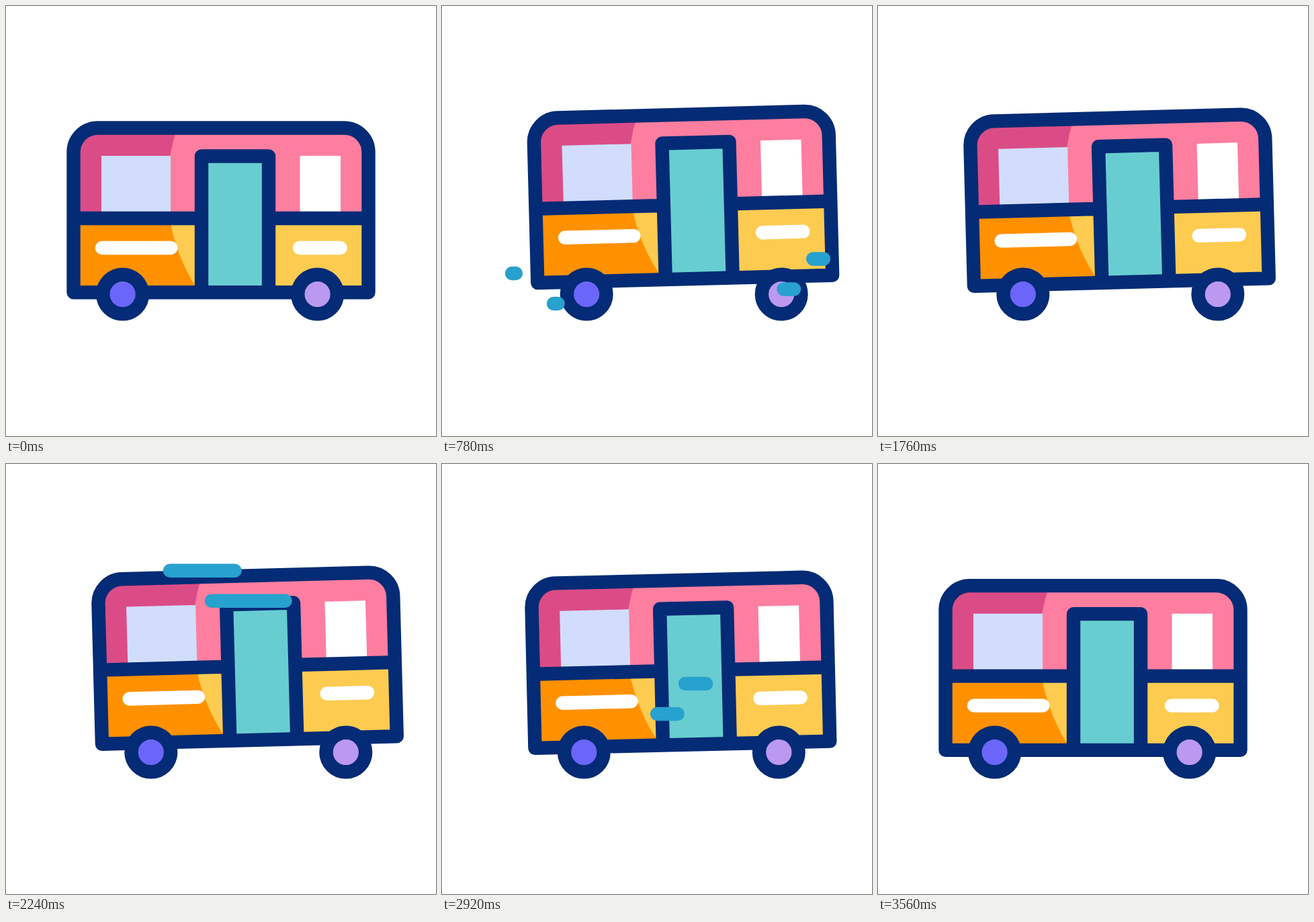
An HTML page that plays this animation: 640 by 640 pixels, repeating every 3.6 s.

```html
<!DOCTYPE html>
<html lang="en">
<head>
<meta charset="utf-8">
<title>Camper</title>
<style>
  html, body { margin: 0; width: 100%; height: 100%; overflow: hidden; background: #fff; }
  svg { display: block; width: 100vw; height: 100vh; }
</style>
</head>
<body>
<svg viewBox="0 0 640 640">
  <g id="body">
    <path fill="#fe7ea0" d="M100.5 316V217.500a36 36 0 0 1 36-36h367a36 36 0 0 1 36 36V316z"/>
    <path fill="#db4c86" d="M100.5 316V217.500a36 36 0 0 1 36-36H255A276 276 0 0 0 243.700 316z"/>
    <path fill="#fdcb50" d="M100.5 316h439v110h-439z"/>
    <path fill="#ff9100" d="M100.5 316H243.700A276 276 0 0 0 287.400 426H100.500z"/>
    <path fill="#d2ddfd" d="M142 223h103v93H142z"/>
    <path fill="#fff" d="M437.500 223H498v93h-60.500z"/>
    <path fill="#68cdd1" d="M291 223.500h100V426H291z"/>
    <g fill="none" stroke="#042b75" stroke-width="20.4" stroke-linejoin="round">
      <path d="M100.500 426.200V217.500a36 36 0 0 1 36-36h367a36 36 0 0 1 36 36V426.200z"/>
      <path d="M100.500 316H291M391 316H539.500M291 426V223.500H391V426"/>
    </g>
    <path stroke="#fff" stroke-width="20.4" stroke-linecap="round" d="M143 360H245.300M437 360H497.500"/>
  </g>
  <g id="wheels" stroke="#042b75" stroke-width="20.4">
    <circle cx="173.6" cy="429" r="29.3" fill="#6b66f9"/>
    <circle cx="463.6" cy="429" r="29.3" fill="#bc99f0"/>
  </g>
  <g id="wind" stroke="#27a1cd" stroke-width="20.4" stroke-linecap="round"></g>
</svg>
<script>
const LOOP = 3600, BEAT = 400, HOP = 14, SWEEP = 320;
const $ = id => document.getElementById(id);
const ease = u => {
  u = Math.min(1, Math.max(0, u));
  return u * u * (3 - 2 * u);
};

// Back up, dash forward, hold, then roll home
function drive(t) {
  const out = ease(t / BEAT);
  const dash = ease((t - BEAT) / BEAT);
  const home = ease((t - 2800) / 600);
  const back = out - dash, ahead = dash - home;
  return { x: 42.2 * ahead - 51 * back, tilt: 2.4 * back - 1.5 * ahead };
}

// Smooth up and down, one beat each way
function hop(t) {
  const u = Math.max(0, t / BEAT - 1) % 2;
  return HOP * ease(1 - Math.abs(u - 1));
}

// Pairs of wind streaks, placed by the left end of the upper one
const streaks = [];
function addStreak(start, x, y, len) {
  const el = document.createElementNS("http://www.w3.org/2000/svg", "line");
  el.setAttribute("y1", y);
  el.setAttribute("y2", y);
  $("wind").appendChild(el);
  streaks.push({ el, start, x, len });
}
[[104, 398], [436, 376.5], [244, 158.7], [362, 327]].forEach(([x, y], i) => {
  const odd = i % 2;
  const start = 197 + 515 * odd + 1680 * (i >> 1);
  addStreak(start, x, y, odd ? 132 : 104.5);
  addStreak(start, x + (odd ? -42 : 62), y + 45, odd ? 130 : 118.5);
});

// Each streak grows leftwards, then its tail catches up
function drawStreak({ el, start, x, len }, t) {
  const age = t - start;
  const on = age > 0 && age < 2 * SWEEP - 10;
  el.setAttribute("visibility", on ? "visible" : "hidden");
  el.setAttribute("x1", x + len * (1 - ease(age / SWEEP)));
  el.setAttribute("x2", x + len * (1 - ease((age + 10) / SWEEP - 1)));
}

function draw(t) {
  const { x, tilt } = drive(t);
  $("body").setAttribute("transform", `translate(${x} ${-hop(t)}) rotate(${tilt} 90 418)`);
  $("wheels").setAttribute("transform", `translate(${x} 0)`);
  streaks.forEach(s => drawStreak(s, t));
}

const begin = performance.now();
function tick() {
  draw((performance.now() - begin) % LOOP);
  requestAnimationFrame(tick);
}
draw(0);
requestAnimationFrame(tick);
</script>
</body>
</html>
```
